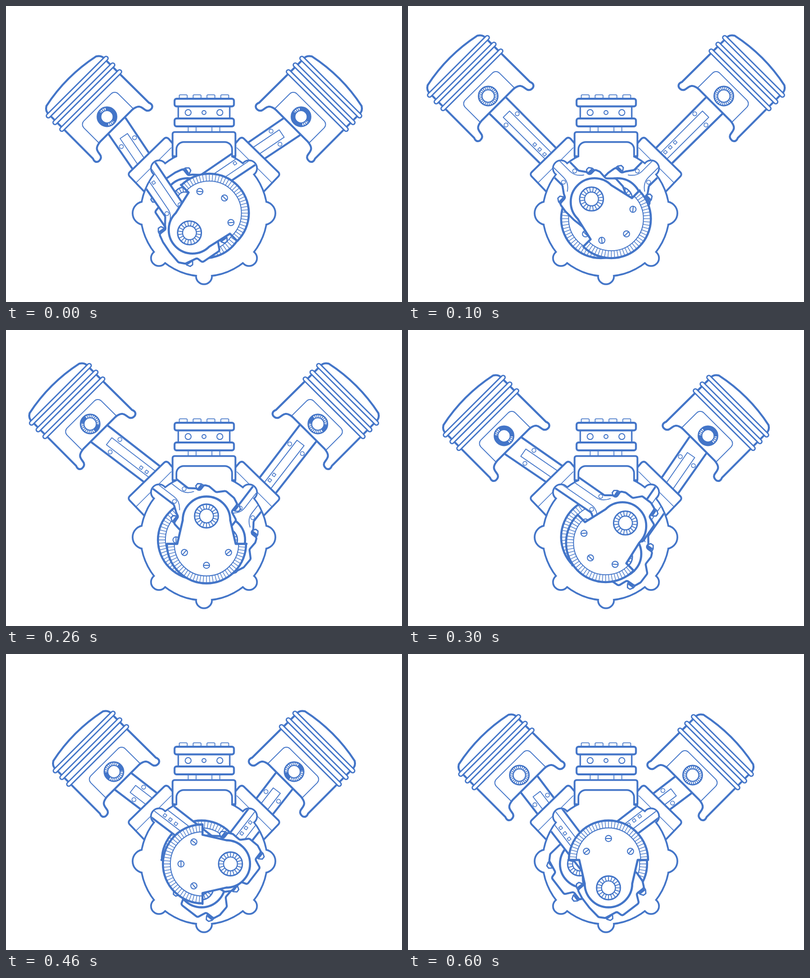
Recreate the animation shown at these times as an HTML page with a canvas. Size 800 by 600 pixels, loop 0.7 s.

```html
<!DOCTYPE html>
<html lang="en">
<head>
<meta charset="utf-8">
<title>V-twin engine</title>
<style>
  html, body { margin: 0; width: 100%; height: 100%; overflow: hidden; background: #fff; }
  canvas { display: block; }
</style>
</head>
<body>
<canvas id="stage" width="800" height="600"></canvas>
<script>
const ctx = document.getElementById('stage').getContext('2d');
const BLUE = '#4375c8', TAU = Math.PI * 2, RAD = Math.PI / 180;
const STEP = 100, THROW = 48.5, PIVOT = 33;

// One entry per pose: crank angle (clockwise from top), piston travel from
// top dead centre, and how much of the wrist bearing is inked in.
const POSES = [
  { crank: 225, travel: 42, ink: 130, gap: 60 },
  { crank: 315, travel: 0, ink: 0, gap: 0 },
  { crank: 0, travel: 8, ink: 50, gap: 120 },
  { crank: 45, travel: 32, ink: 130, gap: 30 },
  { crank: 90, travel: 56, ink: 50, gap: 60 },
  { crank: 135, travel: 68, ink: 0, gap: 0 },
  { crank: 180, travel: 63, ink: 0, gap: 0 }
];

const ROD = [
  [20, 23.5], [236, 22], [250, 32], [258, 31], [258, 47], [268, 51], [286, 50],
  [300, 64], [322, 63], [335, 57], [335, 38], [344, 34], [353, 30], [353, -12],
  [340, -16], [336, -42], [326, -52], [300, -55], [275, -55], [257, -52],
  [256, -36], [248, -32], [234, -22], [20, -23.5]
];

function paint(width, fill) {
  if (fill) { ctx.fillStyle = fill; ctx.fill(); }
  ctx.strokeStyle = BLUE;
  ctx.lineWidth = width;
  ctx.stroke();
}

function line(width, ...pts) {
  ctx.beginPath();
  pts.forEach(([x, y]) => ctx.lineTo(x, y));
  paint(width);
}

function circle(x, y, r, width, fill) {
  ctx.beginPath();
  ctx.arc(x, y, r, 0, TAU);
  paint(width, fill);
}

function box(x, y, w, h, r, width, fill = '#fff') {
  ctx.beginPath();
  ctx.roundRect(x, y, w, h, r);
  paint(width, fill);
}

function softPoly(pts, r) {
  const last = pts[pts.length - 1];
  ctx.beginPath();
  ctx.moveTo((pts[0][0] + last[0]) / 2, (pts[0][1] + last[1]) / 2);
  pts.forEach((p, i) => {
    const q = pts[(i + 1) % pts.length];
    ctx.arcTo(p[0], p[1], q[0], q[1], r);
  });
  ctx.closePath();
}

function at(x, y, angle, draw) {
  ctx.save();
  ctx.translate(x, y);
  ctx.rotate(angle);
  draw();
  ctx.restore();
}

function ticks(x, y, r0, r1, from, to, n, width) {
  ctx.beginPath();
  for (let i = 0; i <= n; i++) {
    const a = from + (to - from) * i / n, c = Math.cos(a), s = Math.sin(a);
    ctx.moveTo(x + c * r0, y + s * r0);
    ctx.lineTo(x + c * r1, y + s * r1);
  }
  paint(width);
}

function bearing(x, y, r0, r1, n) {
  circle(x, y, r1, 2.8, '#fff');
  circle(x, y, r0, 2.2);
  ticks(x, y, r0, r1, 0, TAU, n, 1.7);
}

function bolt(x, v, dir) {
  ctx.beginPath();
  [[8, -8], [0, -7], [-6, -3], [-6, 3], [0, 7], [8, 8]]
    .forEach(([a, b]) => ctx.lineTo(x - dir * a, v + b));
  ctx.closePath();
  paint(2.6, '#fff');
  line(5, [x - dir * 2, v - 6], [x - dir * 2, v + 6]);
}

function rod(r) {
  at(r.x, r.y, r.angle, () => {
    ctx.scale(1, -1);
    ctx.translate(-PIVOT, 0);
    bolt(252, 38, -1);
    bolt(252, -44, -1);
    bolt(340, 50, 1);
    bolt(340, -34, 1);
    softPoly(ROD, 5);
    paint(4, '#fff');
    ctx.beginPath();
    ctx.moveTo(250, 24);
    ctx.quadraticCurveTo(240, 9, 225, 9);
    ctx.lineTo(52, 9);
    ctx.lineTo(52, -9);
    ctx.lineTo(225, -9);
    ctx.quadraticCurveTo(240, -9, 250, -24);
    paint(1.7);
    for (const x of [67, 231]) {
      circle(x, 16, 4, 1.5, '#fff');
      circle(x, -16, 4, 1.5, '#fff');
    }
    for (const x of [136, 150, 164]) {
      ctx.beginPath();
      ctx.rect(x - 2.8, -5.8, 5.6, 5.6);
      paint(1.4, '#fff');
    }
  });
}

function piston(x, y, angle, pose) {
  at(x, y, angle, () => {
    ctx.beginPath();
    ctx.moveTo(26, -46);
    ctx.bezierCurveTo(28, -66, 38, -62, 47, -65);
    ctx.quadraticCurveTo(53, -68, 52, -76);
    ctx.quadraticCurveTo(49, -84, 40, -80);
    ctx.lineTo(-86, -79.5);
    ctx.quadraticCurveTo(-96, -81, -102, -71);
    ctx.quadraticCurveTo(-117, 0, -102, 71);
    ctx.quadraticCurveTo(-96, 81, -86, 79.5);
    ctx.lineTo(40, 80);
    ctx.quadraticCurveTo(49, 84, 52, 76);
    ctx.quadraticCurveTo(53, 68, 47, 65);
    ctx.bezierCurveTo(38, 62, 28, 66, 26, 46);
    ctx.closePath();
    paint(4, '#fff');
    for (const a of [-85, -66, -46.5]) box(a - 4, -86.5, 8, 173, 4, 2.7);
    ctx.beginPath();
    ctx.moveTo(26, -49);
    ctx.arcTo(-27, -49, -27, 0, 10);
    ctx.arcTo(-27, 49, 26, 49, 10);
    ctx.lineTo(26, 49);
    paint(1.8);
  });
  bearing(x, y, 12.5, 19.5, 26);
  if (!pose.ink) return;
  for (const turn of [90, 270]) {
    const mid = (pose.gap + turn) * RAD, half = pose.ink / 2 * RAD;
    ctx.beginPath();
    ctx.arc(x, y, 16, mid - half, mid + half);
    paint(8);
  }
}

function web(x, y, angle) {
  at(x, y, angle, () => {
    ctx.beginPath();
    ctx.moveTo(-59, 8);
    ctx.lineTo(-48, -40);
    ctx.arc(0, -40, 48, Math.PI, 0);
    ctx.lineTo(59, 8);
    ctx.lineTo(81, 8);
    ctx.arc(0, 8, 80, 0, Math.PI);
    ctx.closePath();
    paint(4.3, '#fff');
    ctx.beginPath();
    ctx.arc(0, 8, 65, 0, Math.PI);
    paint(1.9);
    ticks(0, 8, 65, 80, 0, Math.PI, 36, 1.3);
    for (const [sx, sy, tilt] of [[-44.5, 25.5, -50], [44.5, 25.5, -40], [0, 51.5, 0]]) {
      at(sx, sy, tilt * RAD, () => {
        circle(0, 0, 6.2, 2);
        line(2, [-6, 0], [6, 0]);
      });
    }
    bearing(0, -THROW, 14, 24, 20);
  });
}

function flange() {
  ctx.beginPath();
  ctx.moveTo(279, 376);
  ctx.arcTo(245.5, 341, 324, 264.5, 6);
  ctx.arcTo(324, 264.5, 337, 278, 6);
  ctx.lineTo(337, 279);
  ctx.lineTo(337, 320);
  paint(3.8, '#fff');
  line(1.5, [262, 359], [334, 287]);
}

const casing = new Path2D();
function addDisc(x, y, r) {
  casing.moveTo(x + r, y);
  casing.arc(x, y, r, 0, TAU);
}
addDisc(400, 420, 126.3);
for (const x of [309, 491]) for (const y of [329, 511]) addDisc(x, y, 14.3);
addDisc(400, 548, 14.3);
addDisc(279.5, 420, 22);
addDisc(520.5, 420, 22);
casing.roundRect(346, 277.5, 109, 70, 13);

function head() {
  for (const x of [368, 416]) box(x, 244, 16, 12, 0, 1.6);
  for (const x of [350, 378, 406, 434]) box(x, 180, 16, 9, 2, 1.6);
  box(348, 203, 104, 26, 0, 3);
  box(340.5, 188, 120, 15.5, 4, 3.8);
  box(340.5, 228, 120, 16, 4, 3.8);
  circle(368, 216, 6, 1.9);
  circle(400, 216, 4, 1.9);
  circle(432, 216, 6, 1.9);
}

function block() {
  ctx.beginPath();
  ctx.moveTo(345, 305);
  ctx.lineTo(336.5, 304);
  ctx.arcTo(336.5, 255.5, 400, 255.5, 4);
  ctx.arcTo(463.5, 255.5, 463.5, 304, 4);
  ctx.lineTo(463.5, 304);
  ctx.lineTo(455, 305);
  paint(3.7, '#fff');
}

// The rod swings about a point a little below the wrist bearing.
function makeRod(wristX, wristY, side, cx, cy, crank) {
  const x = wristX + side * PIVOT * Math.SQRT1_2, y = wristY + PIVOT * Math.SQRT1_2;
  const px = cx + Math.sin(crank) * THROW, py = cy - Math.cos(crank) * THROW;
  return { x, y, angle: Math.atan2(py - y, px - x) };
}

function draw(pose) {
  const d = pose.travel, y = 182.5 + d, cy = 425.5;
  const front = pose.crank * RAD, back = front + Math.PI / 2;
  const left = makeRod(162 + d, y, 1, 405, cy, front);
  const right = makeRod(638 - d, y, -1, 395, cy, back);

  ctx.fillStyle = '#fff';
  ctx.fillRect(0, 0, 800, 600);
  ctx.lineJoin = 'round';

  rod(right);
  rod(left);
  piston(162 + d, y, 45 * RAD, pose);
  piston(638 - d, y, 135 * RAD, pose);

  flange();
  ctx.save();
  ctx.translate(800, 0);
  ctx.scale(-1, 1);
  flange();
  ctx.restore();
  head();
  block();

  ctx.save();
  ctx.strokeStyle = BLUE;
  ctx.lineWidth = 7;
  ctx.stroke(casing);
  ctx.fillStyle = '#fff';
  ctx.fill(casing);
  ctx.clip(casing);
  rod(right);
  web(395, cy, back);
  rod(left);
  web(405, cy, front);
  ctx.restore();
}

const start = performance.now();
function tick() {
  const t = Math.max(0, performance.now() - start);
  draw(POSES[Math.floor(t / STEP) % POSES.length]);
  requestAnimationFrame(tick);
}
tick();
</script>
</body>
</html>
```
